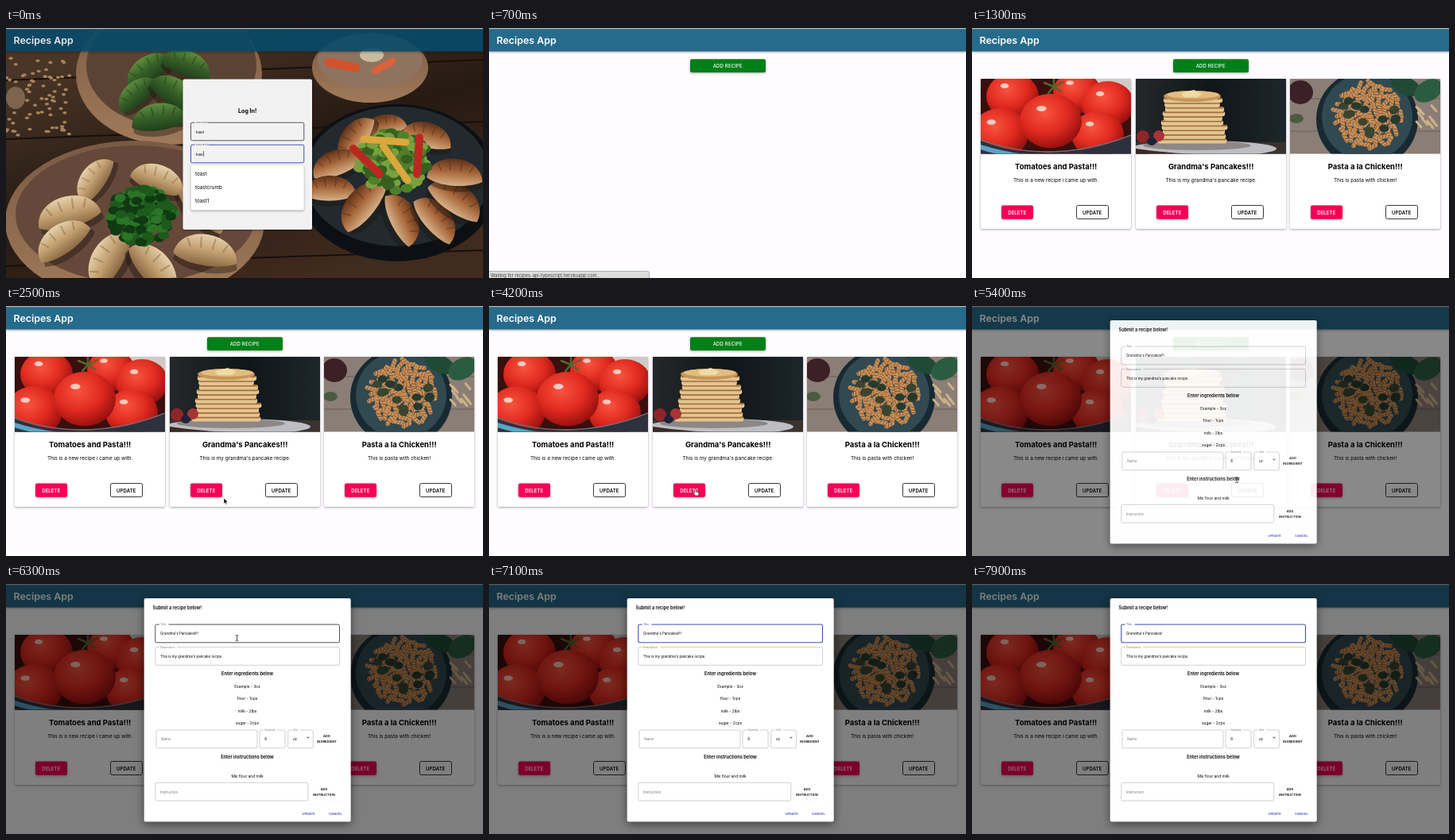
Animation of 600x315 px, one loop 8 s. Source, as an HTML page:

```html
<!DOCTYPE html>
<html lang="en">
<head>
<meta charset="utf-8">
<title>Recipes App</title>
<style>
  html, body { margin: 0; width: 100%; height: 100%; overflow: hidden; background: #fffdff; }
  svg { display: block; font-family: Inter, Roboto, sans-serif; }
  #stage { width: 600px; height: 315px; }
  .raised { filter: drop-shadow(0 1px 1.5px rgba(0, 0, 0, .35)); }
  .lifted { filter: drop-shadow(0 3px 6px rgba(0, 0, 0, .5)); }
</style>
</head>
<body>
<svg id="stage" viewBox="0 0 600 315"></svg>
<script>
const LOOP = 8000;
const stage = document.getElementById('stage');

let seed = 7;
const random = () => (seed = (seed * 16807) % 2147483647) / 2147483647;
const repeat = (n, make) => Array.from({ length: n }, (_, i) => make(i)).join('');

// Drawing helpers
const rect = (x, y, w, h, fill, more = '') =>
  `<rect x="${x}" y="${y}" width="${w}" height="${h}" fill="${fill}" ${more}/>`;
const oval = (x, y, rx, ry, fill, more = '') =>
  `<ellipse cx="${x}" cy="${y}" rx="${rx}" ry="${ry}" fill="${fill}" ${more}/>`;
const path = (d, fill, more = '') => `<path d="${d}" fill="${fill}" ${more}/>`;
const line = (d, color, width, more = '') =>
  path(d, 'none', `stroke="${color}" stroke-width="${width}" stroke-linecap="round" ${more}`);
const text = (x, y, size, label, more = '') =>
  `<text x="${x}" y="${y}" font-size="${size}" ${more}>${label}</text>`;
const centered = (x, y, size, label, more = '') =>
  text(x, y, size, label, `text-anchor="middle" ${more}`);
const group = (id, content, more = '') => `<g id="${id}" ${more}>${content}</g>`;
const gradient = (id, angle, ...colors) =>
  `<linearGradient id="${id}" gradientTransform="rotate(${angle} .5 .5)">` +
  colors.map((c, i) => `<stop offset="${i / (colors.length - 1)}" stop-color="${c}"/>`).join('') + '</linearGradient>';

const leaves = (x, y, r, n, colors) => repeat(n, i => {
  const a = random() * 6.283, d = Math.sqrt(random()) * r;
  return oval(x + d * Math.cos(a), y + d * Math.sin(a) * .85, r * .17, r * .13, colors[i % colors.length]);
});

const dumpling = (x, y, angle, size, fill, edge) =>
  `<g transform="translate(${x} ${y}) rotate(${angle}) scale(${size})">` +
  path('M-27 8C-25-20 24-20 27 8C16 16-14 18-27 8Z', '#1c120b', 'opacity=".4" transform="translate(1 4)"') +
  path('M-27 7C-25-20 24-20 27 7C15 14-14 16-27 7Z', `url(#${fill})`) +
  line('M-14-1L-17-7M-5-2L-6-10M5-2L6-10M14-1L17-7', edge, 1.5, 'opacity=".4"') + '</g>';

const field = (id, x, y, w, h, label, value, back = '#fff') =>
  rect(x, y, w, h, 'none', `id="${id}" rx="1.7" stroke="#c4c4c4" stroke-width=".8"`) +
  (label && rect(x + 5, y - 1, label.length * 1.75 + 3, 2, back) +
    text(x + 6.3, y + 1, 3.4, label, `id="${id}Label" fill="#777"`)) +
  text(x + 6.3, y + h / 2 + 2, 4.4, value, `id="${id}Value"`);

// Photo stand-ins
function tablePhoto() {
  const spots = (list, fill, edge) => list.map(([x, y, a, s]) => dumpling(x, y, a, s, fill, edge)).join('');
  return rect(0, 0, 600, 315, 'url(#wood)') +
    line('M0 66L600 40M0 140L600 118M0 300L600 280', '#160f0b', 2) +
    repeat(75, () => oval(random() * 80, 38 + random() * 100, 2.6, 1.8, '#a5835c')) +
    oval(12, 88, 12, 14, '#7c6450') +
    oval(205, 58, 117, 89, 'url(#clay)') + oval(208, 47, 107, 78, '#5b4334') +
    spots([[178, 52, -35, 1.2], [228, 45, 20, 1.2], [164, 82, -40, 1.1], [214, 82, 35, 1.3], [192, 112, -8, 1.3]], 'spinach', '#1c3315') +
    oval(458, 50, 73, 44, 'url(#clay)') + oval(458, 41, 66, 34, '#8e7361') +
    line('M406 43L440 50', '#d3522b', 11) + line('M464 54L486 42', '#d9633a', 9) + oval(460, 34, 15, 9, '#cbbba0') +
    oval(162, 244, 163, 102, 'url(#clay)') + oval(163, 235, 151, 87, '#66483a') +
    spots([[110, 190, -55, 1.2], [192, 190, 20, 1.3], [78, 232, -15, 1.5], [250, 226, 45, 1.4],
      [70, 266, -35, 1.4], [128, 290, -60, 1.5], [188, 302, 50, 1.5], [252, 280, 10, 1.5]], 'dough', '#7a5c3c') +
    leaves(170, 237, 41, 170, ['#0f3a12', '#1d5a1c', '#2c7428']) +
    oval(492, 195, 127, 99, '#0c1014') + oval(492, 187, 117, 88, '#22292f') +
    spots([[474, 124, -15, 1.1], [530, 135, 15, 1.2], [438, 138, -55, 1.2], [415, 170, -20, 1.2], [408, 202, 0, 1.2],
      [447, 222, -50, 1.4], [500, 240, 65, 1.3], [542, 240, 50, 1.3], [567, 215, 35, 1.4], [565, 182, 5, 1.3]], 'fried', '#4c2816') +
    leaves(487, 168, 44, 170, ['#35601f', '#507f2b', '#78a03f']) +
    line('M437 152L470 184M520 138L517 184', '#bb2822', 10) +
    line('M450 140L503 144M474 148L505 192', '#dba83c', 9);
}

function tomatoPhoto() {
  const tomatoes = [[121, 17, 30], [40, 22, 33], [160, 32, 33], [24, 69, 36], [147, 70, 33], [88, 53, 39]];
  return rect(0, 0, 189, 95, '#3a0f0d') + path('M140 0H189V45Z', '#cfcac6') +
    tomatoes.map(([x, y, r]) => oval(x, y, r, r * .88, 'url(#tomato)') +
      oval(x - r * .3, y - r * .4, r * .16, r * .09, '#ffe0d6', 'opacity=".85"')).join('') +
    line('M92 10L80 5M92 10L104 4M92 10L101 16M92 10L85 18M92 10V1', '#50682e', 2.5) +
    path('M0 78Q85 112 189 72V95H0Z', '#2c313d') +
    line('M0 86Q25 94 55 98', '#5aa4c8', 6) + line('M0 77Q90 110 189 71', '#6b6f78', 1.5);
}

function pancakePhoto() {
  return rect(0, 0, 189, 95, 'url(#night)') + rect(0, 80, 189, 15, '#39322e') +
    oval(85, 88, 92, 10, '#bdbdc3') + oval(77, 84, 68, 6, '#8d8886') +
    repeat(10, i => {
      const y = 75 - i * 5.7, w = 87 - i * 1.4 - (i % 3) * 3, x = 71 - w / 2 + (i * 5) % 4;
      return rect(x, y, w, 6.5, '#e4c592', 'rx="3.2"') + rect(x + 1, y, w - 2, 2.4, '#a26e39', 'rx="1.2"');
    }) +
    oval(71, 22, 36, 7, '#c6965a') + oval(72, 20, 33, 5, '#e3bd7f') +
    path('M57 18L73 14L84 19L78 23H60Z', '#f0dba4') +
    oval(9, 73, 8, 8, '#8f2529') + oval(29, 72, 7, 7, '#a83436') + oval(20, 79, 6, 5, '#20223a') +
    path('M0 88Q45 95 95 95H0Z', '#3c2924');
}

function pastaPhoto() {
  return rect(0, 0, 189, 95, '#8b7e76') + line('M0 25H189M0 66H189', '#6a5f58', 1.2) +
    oval(13, 17, 16, 15, '#3c2027') + oval(8, 50, 9, 6, '#4d5a42') +
    oval(97, 51, 64, 62, '#182a31') + oval(97, 48, 57, 55, '#314951') +
    repeat(95, i => {
      const a = i * 2.4, d = 4.3 * Math.sqrt(i), turn = random() * 180;
      return `<g transform="translate(${99 + d * Math.cos(a)} ${46 + d * Math.sin(a)}) rotate(${turn})">` +
        rect(-6.5, -2.6, 13, 5.2, '#c98f57', 'rx="2.3"') + line('M-4 2L-2-2M0 2L2-2M4 2L5-1', '#7d4b29', .8) + '</g>';
    }) +
    leaves(99, 46, 36, 16, ['#263a30', '#39452f']) +
    oval(146, 9, 20, 11, '#1f4a36', 'transform="rotate(25 146 9)"') +
    oval(174, 15, 19, 13, '#2b5c41', 'transform="rotate(-30 174 15)"') +
    repeat(10, () => {
      const x = 158 + random() * 24, y = 32 + random() * 24;
      return line(`M${x} ${y}l6 7`, '#cbb089', 3);
    });
}

// App parts
const recipes = [
  ['Tomatoes and Pasta!!!', 'This is a new recipe i came up with.', tomatoPhoto],
  ["Grandma's Pancakes!!!", "This is my grandma's pancake recipe.", pancakePhoto],
  ['Pasta a la Chicken!!!', 'This is pasta with chicken!', pastaPhoto]
];
const cardX = i => Math.round(11.3 + i * 194.4);
const buttonText = 'font-weight="600" letter-spacing=".1"';

const card = ([title, note, photo], i) => {
  const x = cardX(i), mid = x + 94.7;
  return rect(x, 64, 189, 189, '#fff', 'rx="2" class="raised"') +
    `<svg x="${x}" y="64" width="189" height="94.5" overflow="hidden">${photo()}</svg>` +
    centered(mid, 177.5, 9.5, title, 'font-weight="700"') +
    centered(mid, 194.4, 6.4, note) +
    rect(x + 26, 223.5, 40, 17.3, '#f50057', 'rx="2" class="raised"') +
    centered(x + 45.8, 234.5, 6, 'DELETE', `fill="#fff" ${buttonText}`) +
    rect(x + 120.5, 223.5, 40, 17, '#fff', `id="update${i}" rx="2" stroke="#222" stroke-width=".9"`) +
    centered(x + 140.3, 234.5, 6, 'UPDATE', buttonText);
};

const header = (fill, ink) =>
  rect(0, 0, 600, 29.5, fill, 'class="raised"') + rect(0, 0, 600, 1.2, '#b9b9b9') +
  text(9.5, 20.2, 12.4, 'Recipes App', `fill="${ink}" font-weight="600"`);

const login = tablePhoto() + header('rgba(6,78,112,.85)', '#e6e9ec') +
  rect(222.5, 64.5, 162.5, 189.5, '#f2f2f2', 'rx="2" class="raised"') +
  centered(303.7, 106.7, 7.1, 'Log In!', 'font-weight="700"') +
  field('user', 232.5, 119.2, 142.3, 22.6, 'username', 'toast', '#f2f2f2') +
  field('pass', 232.5, 147.2, 142.3, 22.6, 'password', 'toas', '#f2f2f2') +
  rect(248.3, 155, .6, 7, '#111') +
  group('options', rect(232.7, 173, 142, 56.5, '#fff', 'rx="2" class="raised"') +
    ['toast', 'toastcrumb', 'toast1'].map((name, i) => text(238, 185.7 + i * 17, 6.3, name)).join(''));

const page = rect(0, 0, 600, 315, '#fffdff') + header('#266b8c', '#fff') +
  rect(253, 39.3, 95, 16.7, '#008018', 'rx="2" class="raised"') +
  centered(300.3, 49.8, 6, 'ADD RECIPE', 'fill="#fff" font-weight="500" letter-spacing=".17"') +
  group('cards', recipes.map(card).join(''));

const bold = 'font-weight="600"';
const blue = `${bold} fill="#3f51b5"`;
const dialog = rect(0, 0, 600, 315, '#000', 'opacity=".5"') +
  rect(173.7, 18, 260, 281.5, '#fff', 'rx="2" class="lifted"') +
  text(184.5, 32, 5.6, 'Submit a recipe below!', bold) +
  field('title', 187.8, 51, 231.7, 22.8, 'Title', '') +
  field('note', 187.8, 79.5, 231.7, 22.8, 'Description', recipes[1][1]) +
  centered(303.5, 115, 5.7, 'Enter ingredients below', bold) +
  ['Example - 3oz', 'flour - 1cps', 'milk - 2lbs', 'sugar - 2cps']
    .map((item, i) => centered(303.5, 131.2 + i * 15.2, 4.8, item)).join('') +
  field('name', 189, 184, 127, 22.8, '', 'Name') +
  field('quantity', 319, 184, 32, 22.8, 'Quantity', '8') +
  field('unit', 354.7, 184, 31.7, 22.8, 'Unit', 'oz') + path('M378 192.7h4l-2 2z', '#666') +
  centered(403.5, 193, 4.05, 'ADD', bold) + centered(403.5, 200, 4.05, 'INGREDIENT', bold) +
  centered(303.5, 219.5, 5.7, 'Enter instructions below', bold) +
  centered(303.5, 244.3, 4.8, 'Mix flour and milk') +
  field('step', 187.8, 250.3, 192, 22.7, '', 'Instruction') +
  centered(400, 260, 4, 'ADD', bold) + centered(400, 267, 4, 'INSTRUCTION', bold) +
  centered(380.5, 290.8, 4.1, 'UPDATE', blue) + centered(414.5, 290.8, 4.1, 'CANCEL', blue) +
  rect(0, 58.7, .6, 6.5, '#111', 'id="caret"');

const status = rect(-2, 306.5, 203.5, 12, '#dcdcdc', 'rx="2" stroke="#999" stroke-width=".7"') +
  text(2, 313.6, 5.65, 'Waiting for recipes-api-typescript.herokuapp.com...', 'fill="#444"');

const outline = 'stroke="#fff" stroke-width=".5"';
const pointers =
  group('arrow', path('M0 0V7.2L1.7 5.7L2.9 8.3L4 7.8L2.9 5.3H5Z', '#000', outline)) +
  group('hand', path('M-.8 0Q0-1 .8 0V3L4 3.8L4.6 5L3.8 8H0L-2.6 4.5L-1.8 3.8L-.8 4.7Z', '#fff', 'stroke="#111" stroke-width=".6"')) +
  group('beam', line('M-1.5-3.5Q0-3.5 0-2.7V2.7Q0 3.5-1.5 3.5M1.5-3.5Q0-3.5 0-2.7M0 2.7Q0 3.5 1.5 3.5', '#222', .8));

stage.innerHTML = '<defs>' +
  gradient('wood', 60, '#4a3526', '#261a13', '#412a1e') + gradient('clay', 90, '#7a5a43', '#a07a5a') +
  gradient('night', 0, '#24282a', '#101518', '#1d262b') +
  gradient('dough', 90, '#e6d2ac', '#c3a172', '#8a6844') + gradient('spinach', 90, '#5f8f3f', '#365f28', '#223f1b') +
  gradient('fried', 90, '#5e3119', '#a9693c', '#d6b189') +
  `<radialGradient id="tomato" cx=".4" cy=".35" r=".68"><stop stop-color="#f8543f"/>
  <stop offset=".55" stop-color="#e02a20"/><stop offset="1" stop-color="#930f0e"/></radialGradient></defs>` +
  group('login', login) + group('page', page) + group('dialog', dialog) +
  group('status', status) + group('pointer', pointers);

// Motion
const parts = {};
stage.querySelectorAll('[id]').forEach(el => parts[el.id] = el);
const show = (id, on) => { parts[id].style.display = on ? '' : 'none'; };
const border = (id, color, width) => {
  parts[id].setAttribute('stroke', color);
  parts[id].setAttribute('stroke-width', width);
};
border('user', '#333', .8);
border('pass', '#3f51b5', 1);
['name', 'step'].forEach(id => parts[id + 'Value'].setAttribute('fill', '#777'));

// Pointer stops: time, x, y
const stops = [[1500, 450, 180], [2400, 274, 242], [2500, 274, 242], [3000, 300, 284], [3200, 300, 284], [4000, 259.5, 231],
  [4300, 259.5, 231], [4800, 345, 231], [5200, 345, 231], [5400, 333, 219], [5900, 333, 219],
  [6250, 290.5, 68], [6400, 290.5, 68], [6600, 262, 63]];

function pointerAt(t) {
  const next = stops.findIndex(stop => stop[0] > t);
  if (next < 1) return (next ? stops[stops.length - 1] : stops[0]).slice(1);
  const [t0, x0, y0] = stops[next - 1], [t1, x1, y1] = stops[next];
  const k = (t - t0) / (t1 - t0), s = k * k * (3 - 2 * k);
  return [x0 + (x1 - x0) * s, y0 + (y1 - y0) * s];
}

function render(t) {
  show('login', t < 500);
  show('page', t >= 500);
  show('options', t < 200);
  show('status', t >= 300 && t < 1000);
  show('cards', t >= 1000);
  parts.passValue.textContent = t < 100 ? 'toas' : 'toast';

  const fade = Math.min(1, Math.max(0, (t - 5200) / 300));
  show('dialog', fade > 0);
  parts.dialog.setAttribute('opacity', 1 - (1 - fade) ** 2.3);

  const [x, y] = pointerAt(t);
  const inside = (left, top, w, h) => x > left && x < left + w && y > top && y < top + h;
  const overUpdate = inside(cardX(1) + 120, 223, 41, 18);
  const overButton = overUpdate || inside(cardX(1) + 25, 223, 41, 18);
  const kind = fade > 0 ? 'beam' : overButton ? 'hand' : 'arrow';
  ['arrow', 'hand', 'beam'].forEach(id => show(id, id === kind));
  show('pointer', t >= 1500 && t < 6800);
  parts.pointer.setAttribute('transform', `translate(${x} ${y})`);
  parts.update1.setAttribute('fill', overUpdate && t >= 4300 ? '#f2f2f2' : '#fff');

  const focused = t >= 6600;
  const hovered = fade > 0 && inside(188, 51, 232, 23);
  border('title', focused ? '#3f51b5' : hovered ? '#222' : '#c4c4c4', focused ? 1.1 : .8);
  parts.titleLabel.setAttribute('fill', focused ? '#3f51b5' : '#777');
  const marks = t < 7200 ? 3 : t < 7700 ? 2 : 1;
  parts.titleValue.textContent = "Grandma's Pancakes" + '!'.repeat(marks);
  show('caret', focused && Math.floor((t - 6400) / 500) % 2 === 0);
  if (focused) parts.caret.setAttribute('x', 194.4 + parts.titleValue.getComputedTextLength());
}

const start = performance.now();
function tick() {
  render((performance.now() - start) % LOOP);
  requestAnimationFrame(tick);
}
tick();
</script>
</body>
</html>
```
